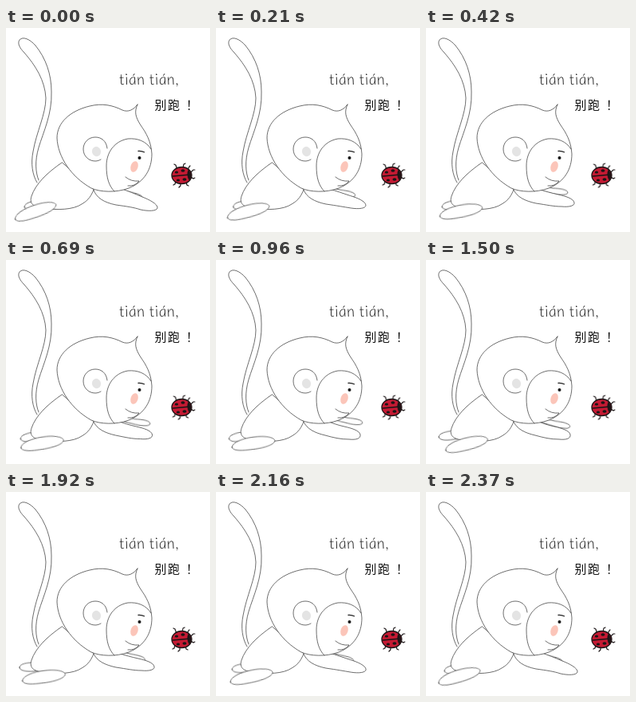
These frames come from a looping animation (256 px wide and 256 px high, 2400 ms). An HTML page:

```html
<!DOCTYPE html>
<html lang="zh">
<head>
<meta charset="utf-8">
<title>Monkey and ladybird</title>
<style>
  html, body { margin: 0; width: 100%; height: 100%; overflow: hidden; background: #fff; }
  svg { display: block; width: 100%; height: 100%; }
  .line { fill: #fff; stroke: #3c3c3c; stroke-width: .75; stroke-linecap: round; stroke-linejoin: round; }
  .open { fill: none; }
  .move { animation: 2400ms linear infinite; }

  .arm { animation-name: arm; }
  @keyframes arm {
    0%, 98.75%, 100% { d: path("M110 203C113 213 123 219 138 222C152 224 160 225 169 228C178 230 189 230 190 226C191 221 179 215 171 212C162 208 154 205 143 201"); }
    17.5%, 80% { d: path("M110 203C114 212 124 217 138 220C152 222 160 224 170 224C180 225 187 223 186 219C185 214 175 211 166 209C157 207 150 205 140 202"); }
    40%, 52.5%, 62.5% { d: path("M110 203C114 212 124 217 137 220C148 223 156 225 167 225C176 226 182 224 181 219C180 214 170 211 161 209C152 207 147 205 139 202"); }
  }

  .hand { animation-name: hand; }
  @keyframes hand {
    0%, 98.75%, 100% { transform: translate(151px, 208px) rotate(10deg); }
    17.5% { transform: translate(157px, 204px) rotate(2deg); }
    40% { transform: translate(163px, 201px) rotate(4deg); }
    52.5% { transform: translate(164px, 204px) rotate(6deg); }
    62.5% { transform: translate(160px, 205px) rotate(6deg); }
    80% { transform: translate(154px, 206px) rotate(8deg); }
  }

  .near { animation-name: near; }
  @keyframes near {
    0%, 100% { transform: translate(37px, 230px) rotate(-13deg); }
    17.5% { transform: translate(44px, 230px) rotate(-5deg); }
    40% { transform: translate(47px, 230px) rotate(-2deg); }
    52.5% { transform: translate(53px, 231px) rotate(-6deg); }
    62.5% { transform: translate(51px, 231px) rotate(-8deg); }
    80% { transform: translate(47.5px, 232px) rotate(-2deg); }
    98.75% { transform: translate(42px, 231px) rotate(-10deg); }
  }

  .far { animation-name: far; }
  @keyframes far {
    0%, 98.75%, 100% { transform: translate(45px, 221px) rotate(-4deg); }
    52.5% { transform: translate(36px, 220px) rotate(-6deg); }
    62.5% { transform: translate(38px, 219px) rotate(-3deg); }
    80% { transform: translate(39px, 219px) rotate(2deg); }
  }

  .legs { fill: none; stroke: #1b1516; stroke-width: 1.2; stroke-linecap: round; stroke-linejoin: round; animation-name: legs; }
  @keyframes legs {
    0%, 22.5%, 45%, 67.5%, 90%, 100% { transform: none; }
    11.25%, 33.75%, 56.25%, 78.75% { transform: translateX(-1px); }
  }

  text { fill: #111; }
  .name { font: italic 300 19px Lato, sans-serif; letter-spacing: .7px; }
  .call { font: 400 15px "Noto Sans CJK SC", "Noto Sans CJK", sans-serif; }
</style>
</head>
<body>
<svg viewBox="0 0 256 256">
  <path class="line" d="M39 194C33 184 31 170 34 155C38 131 50 108 50 88C49 66 37 47 23 31C17 25 14 19 17 15C21 10 30 14 37 22C50 38 57 58 57 80C58 108 47 130 41 150C36 167 37 181 41 191"/>

  <path class="line move far" d="M-22 2C-22 -3 -12 -5 2 -5C14 -5 22 -2 22 1C21 5 10 5 -4 6C-14 7 -22 6 -22 2Z"/>
  <path class="line move hand" d="M-22 -7C-13 -5 -7 -4 2 -3C11 -3 21 -2 21 2C20 6 8 5 -1 3C-9 2 -16 0 -22 -3"/>
  <path class="line" d="M70 169C51 182 37 196 32 211C29 220 34 225 47 226C64 229 85 228 95 221C104 216 107 210 110 203Z"/>
  <path class="line move near" d="M-27 4C-27 -2 -13 -7 3 -8C17 -9 27 -6 27 -2C25 4 9 7 -6 8C-18 9 -27 8 -27 4Z"/>
  <path class="line move arm"/>

  <path class="line" d="M165 96C160 103 153 106 146 103C134 97 121 94 105 98C80 104 64 119 64 138C65 162 82 187 107 201C118 206 138 207 154 201C174 193 183 177 183 158C182 142 176 132 169 122C162 111 161 105 165 96Z"/>
  <path class="line open" d="M182 152C176 142 165 138 153 139C136 142 126 156 126 173C126 188 129 198 136 205"/>
  <path class="line open" d="M127 151C126 142 120 137 112 137C103 137 97 144 97 152C97 161 104 167 112 167C115 167 117 166 119 165"/>
  <ellipse cx="113.5" cy="155" rx="5.5" ry="6.2" transform="rotate(-20 113.5 155)" fill="#e4e4e4"/>
  <ellipse cx="161" cy="174" rx="4.5" ry="7" transform="rotate(18 161 174)" fill="#fbc5b9"/>
  <path d="M165.5 154.5Q170 154 174 156" fill="none" stroke="#222" stroke-width="1.3"/>
  <circle cx="167.5" cy="163" r="2" fill="#151515"/>
  <path class="line" d="M150 187Q157 193 167 192Q162 199 153 198"/>

  <g class="move legs">
    <path d="M215 178L213 172L211 171M222 176L223 171L225 170M228 178L230 174L231 173"/>
    <path d="M213 192L212 196L210 197M219 194L219 198L217 200M226 193L227 197L229 198"/>
  </g>
  <g stroke="#1b1516" stroke-linecap="round">
    <path d="M232 181L235 178L237 178M232 187L235 189L237 188" fill="none" stroke-width="1.1"/>
    <ellipse cx="220.5" cy="185" rx="12.5" ry="10.5" fill="#c41a33" stroke-width="1.3"/>
    <path d="M209 186L231 184" stroke-width="1.4"/>
    <path d="M229 178Q226 184 230 191Q235 185 229 178Z" fill="#1b1516" stroke-width=".6"/>
  </g>
  <g fill="#1b1516">
    <ellipse cx="214" cy="181" rx="2.2" ry="1.6"/>
    <ellipse cx="222" cy="179" rx="2.5" ry="1.8"/>
    <ellipse cx="216" cy="191" rx="2.2" ry="1.6"/>
    <ellipse cx="224" cy="190" rx="2.5" ry="1.8"/>
  </g>

  <text class="name" transform="translate(143 71) skewX(9)">tián tián,</text>
  <text class="call" y="101.5"><tspan x="186.5">别</tspan><tspan x="203">跑</tspan><tspan x="226">！</tspan></text>
</svg>
</body>
</html>
```
